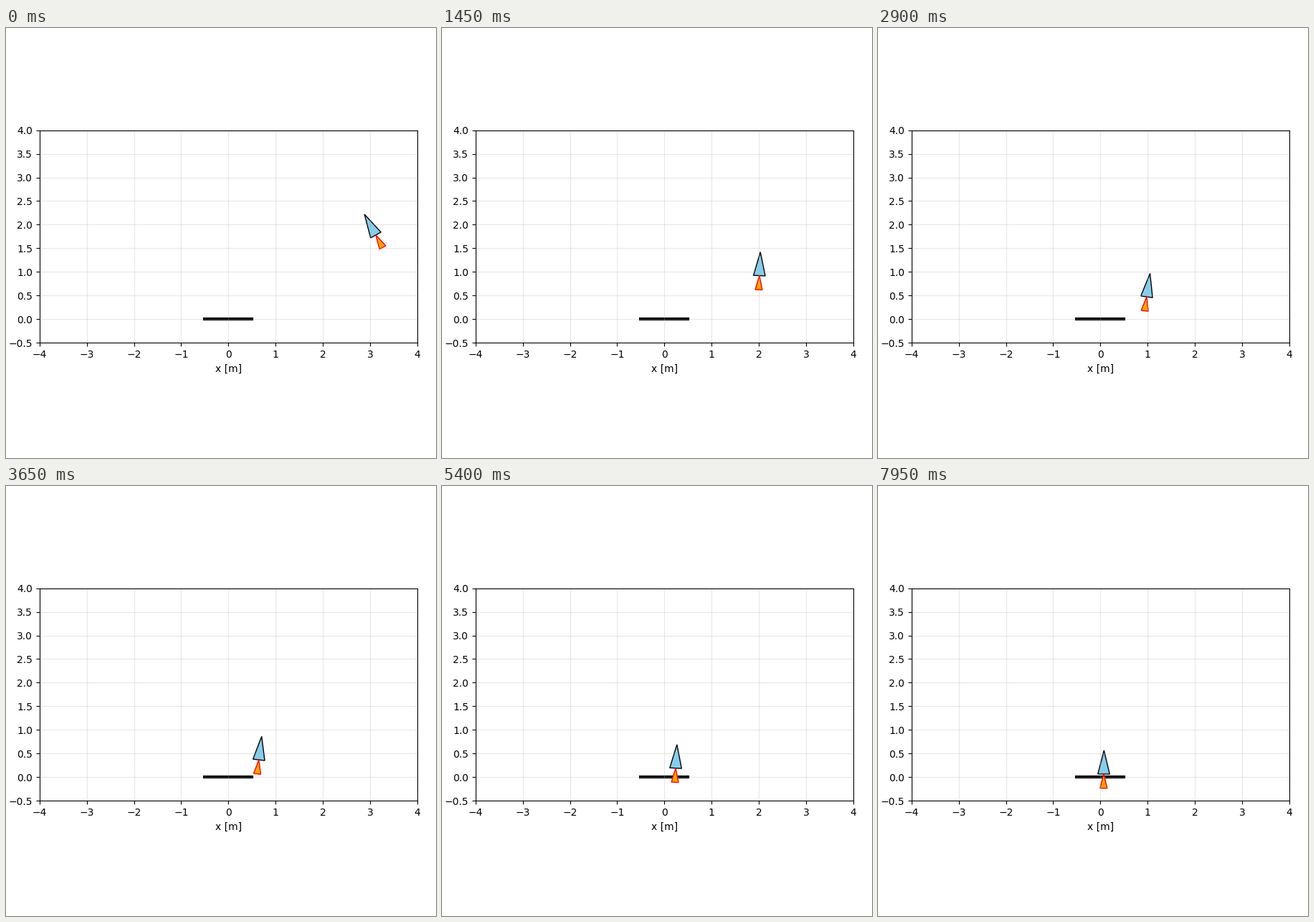
A matplotlib script for the animation above (8000 ms loop, 600 by 600 pixels).

```python
import numpy as np
import matplotlib.pyplot as plt
from matplotlib.animation import FuncAnimation

FRAMES, INTERVAL = 160, 50
GRAVITY = 1.62
RATE = 0.4  # how fast the approach dies out, per second

# Triangles in the rocket's own frame, nose up
BODY = np.array([[0, 0.25], [-0.125, -0.25], [0.125, -0.25]])
FLAME = BODY * 0.6 - [0, 0.4]


def ring(t, decay, freq, a, b):
    """Damped oscillation."""
    return np.exp(-decay * t) * (a * np.cos(freq * t) + b * np.sin(freq * t))


def x_at(t):
    return np.exp(-RATE * t) * (1.97 + ring(t, 0.287, 0.451, 1.03, 2.74))


def y_at(t):
    return 0.25 + np.exp(-RATE * t) * (1.6 + ring(t, 0.25, 1.4, 0.15, 0.145))


def tilt_at(t, h=1e-3):
    """Lean that gives the sideways acceleration; thrust is stronger at first."""
    accel = (x_at(t + h) - 2 * x_at(t) + x_at(t - h)) / h**2
    thrust = GRAVITY + 0.4 * np.exp(-4 * t)
    return -np.arctan(accel / thrust)


def place(shape, t):
    c, s = np.cos(tilt_at(t)), np.sin(tilt_at(t))
    return shape @ np.array([[c, s], [-s, c]]) + [x_at(t), y_at(t)]


fig, ax = plt.subplots(figsize=(6, 6), dpi=100)
fig.tight_layout()
ax.set_aspect("equal")
ax.set_xlim(-4, 4)
ax.set_ylim(-0.5, 4)
ax.set_xlabel("x [m]")
ax.grid(True, alpha=0.3)

ax.plot([-0.5, 0.5], [0, 0], color="black", lw=3, zorder=1)
body = ax.add_patch(plt.Polygon(place(BODY, 0), fc="skyblue", ec="black"))
flame = ax.add_patch(plt.Polygon(place(FLAME, 0), fc="orange", ec="red"))


def update(frame):
    t = frame * INTERVAL / 1000
    body.set_xy(place(BODY, t))
    flame.set_xy(place(FLAME, t))
    return body, flame


anim = FuncAnimation(fig, update, frames=FRAMES, interval=INTERVAL,
                     repeat=True, repeat_delay=0)
plt.show()
```
